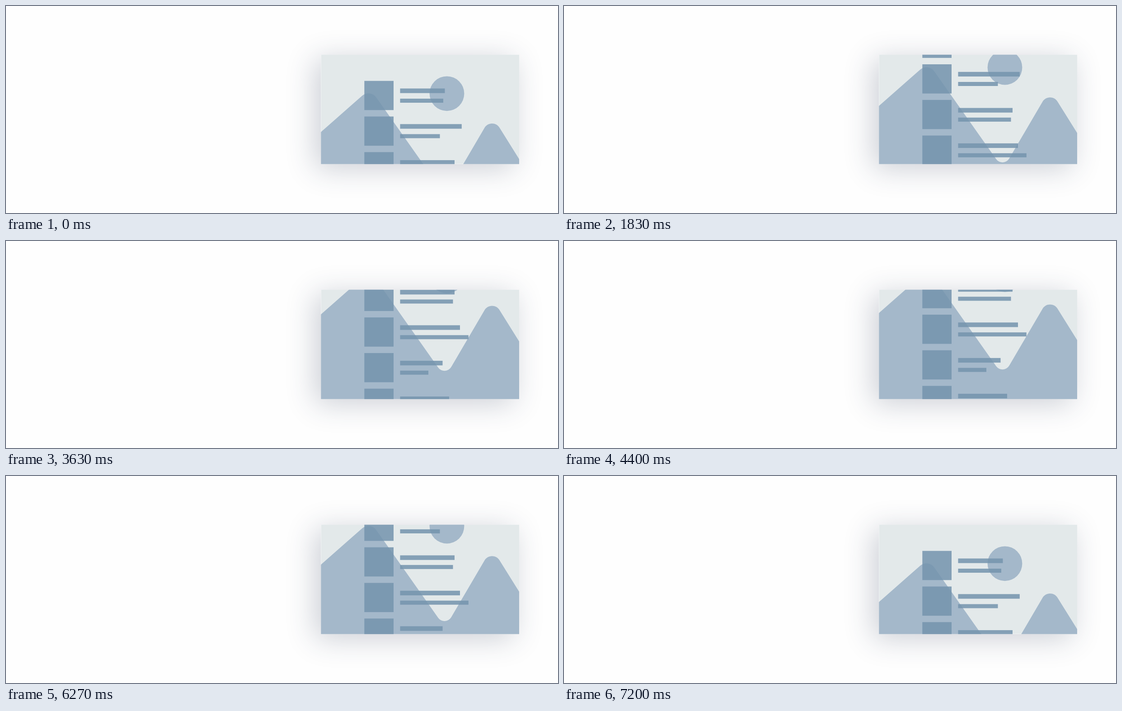
An HTML page for the animation above (8.03 s loop, 1222 by 458 pixels).

```html
<!DOCTYPE html>
<html lang="en">
<head>
<meta charset="utf-8">
<title>Parallax scroll</title>
<style>
  html, body { margin: 0; width: 100%; height: 100%; overflow: hidden; background: #fefefe; }
  .shadow {
    position: absolute; left: 697.3px; top: 107.7px; width: 438.7px; height: 242px;
    box-shadow: -12px 10px 60px rgba(40, 50, 80, .23);
  }
  svg { position: absolute; left: 0; top: 0; display: block; }
</style>
</head>
<body>
<div class="shadow"></div>
<svg width="1222" height="458" viewBox="0 0 1222 458">
  <clipPath id="card"><rect x="697.3" y="107.7" width="438.7" height="242"/></clipPath>
  <g clip-path="url(#card)">
    <rect x="697.3" y="107.7" width="438.7" height="242" fill="#e3e9ea"/>
    <g id="scene" fill="#a4b8ca">
      <circle cx="976" cy="193.8" r="38.4"/>
      <path d="M690 285.2L788.5 198.5A21 21 0 0 1 819.6 202.2L956.7 396.5
        A17.2 17.2 0 0 0 985.6 395.3L1059.4 269.5A19.3 19.3 0 0 1 1092.4 269
        L1142 348.3V700H690Z"/>
    </g>
    <g id="list" fill="#7594ae" fill-opacity=".86"></g>
  </g>
</svg>
<script>
const LOOP = 8030;
const PITCH = 78.8;
const scene = document.getElementById('scene');
const list = document.getElementById('list');

// Per row: right end and top offset of the first bar, then of the second
const rows = [
  [971.5, 16.8, 968, 39.3],
  [1008.8, 16.8, 960.5, 39],
  [993, 17.8, 989.5, 39.1],
  [1005, 17.3, 1023.8, 39.2],
  [966.5, 17.1, 935, 38.9],
  [981, 17.4, 970, 39]
];

function addRect(x, y, w, h) {
  const r = document.createElementNS('http://www.w3.org/2000/svg', 'rect');
  Object.entries({ x, y, width: w, height: h }).forEach(([k, v]) => r.setAttribute(k, v));
  list.appendChild(r);
}

rows.forEach(([end1, dy1, end2, dy2], i) => {
  const top = 165.7 + i * PITCH, left = 872.5;
  addRect(793.3, top, 64.7, 64.6);
  addRect(left, top + dy1, end1 - left, 10.2);
  addRect(left, top + dy2, end2 - left, 9);
});

const expoOut = p => 1 - 2 ** (-10 * p);
const expoInOut = p => p < .5 ? 2 ** (20 * p - 10) / 2 : 1 - 2 ** (10 - 20 * p) / 2;

const moves = [
  { start: 500, dur: 500, to: 71, ease: expoOut },
  { start: 1500, dur: 1000, to: 120.5, ease: expoOut },
  { start: 2996, dur: 1500, to: 239.3, ease: expoOut },
  { start: 5485, dur: 1690, to: 0, ease: expoInOut }
];

function scrollAt(t) {
  let y = 0;
  for (const m of moves) {
    if (t < m.start) break;
    const p = (t - m.start) / m.dur;
    y += (m.to - y) * (p >= 1 ? 1 : m.ease(p));
  }
  return y;
}

function draw(now) {
  const y = scrollAt(now % LOOP);
  list.setAttribute('transform', `translate(0 ${-y})`);
  scene.setAttribute('transform', `translate(0 ${-y / 2})`);
}

const origin = performance.now();
function tick() {
  draw(performance.now() - origin);
  requestAnimationFrame(tick);
}
tick();
</script>
</body>
</html>
```
